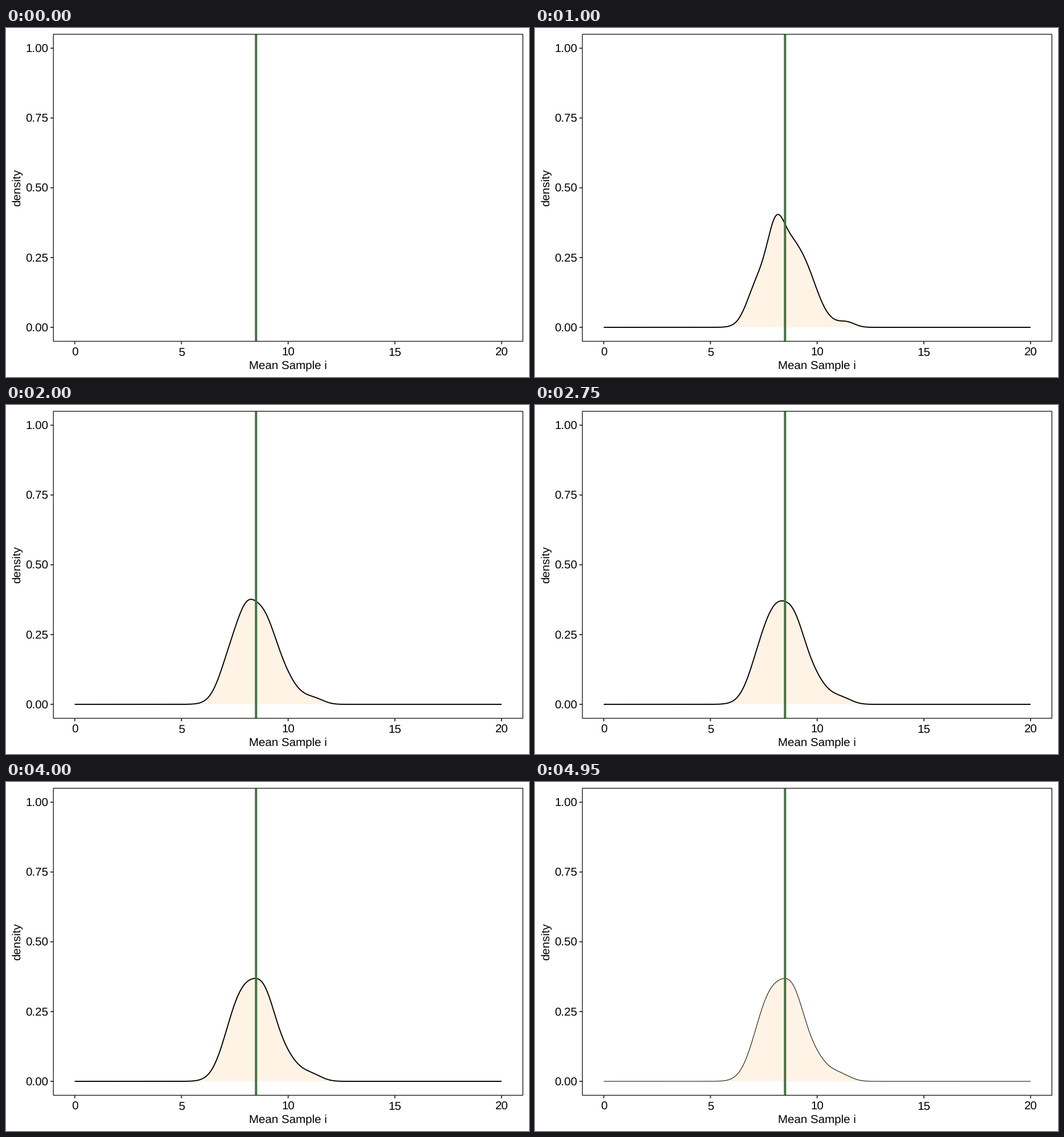
Animation, 917 px wide and 611 px high, one loop 5 s. Source, as a matplotlib script:

```python
import numpy as np
import matplotlib.pyplot as plt
from matplotlib.animation import FuncAnimation
from matplotlib.patches import Polygon, Rectangle

W, H, DPI = 917, 611, 100
PX = 72 / DPI
STEP = 5  # ticks per state, the last one is a blend
TICK_MS = 50
STATES = 19
FRAMES = (STATES + 1) * STEP
FIRST_SHOWN = 3

plt.rcParams["font.family"] = "Liberation Sans"
plt.rcParams["text.hinting"] = "none"
TEXT = dict(fontsize=20.5 * PX, color="black")
LINE = 1.9 * PX
THIN = 1.0 * PX

# Bells (centre, width, height): a lumpy small sample, a smooth large one
LUMPY = [(7.1, .45, .135), (8.1, .43, .388), (8.85, .30, .035),
         (9.35, .62, .255), (11.45, .35, .020)]
SMOOTH = [(7.75, .68, .285), (8.9, .58, .270), (10.0, .50, .062),
          (11.0, .50, .028)]

GRID = np.linspace(0, 20, 512)
LEFT, RIGHT, TOP, BOTTOM = 83.1, 906.3, 11.0, 548.5


def to_x(v):
    return LEFT + (np.asarray(v) + 1) * (RIGHT - LEFT) / 22


def to_y(v):
    return BOTTOM - (np.asarray(v) + .05) * (BOTTOM - TOP) / 1.1


def bells(parts):
    return sum(h * np.exp(-((GRID - c) / s) ** 2 / 2) for c, s, h in parts)


def density(k):
    """Lumps are strongest at the second state and fade with log sample size."""
    lumps = np.exp(-.5 * abs(np.log2((k + 1) / 2)) ** 1.6)
    return lumps * bells(LUMPY) + (1 - lumps) * bells(SMOOTH)


CURVES = [density(k) for k in range(STATES)]

fig = plt.figure(figsize=(W / DPI, H / DPI), dpi=DPI, facecolor="white")
ax = fig.add_axes([0, 0, 1, 1])
ax.set_xlim(0, W)
ax.set_ylim(H, 0)
ax.axis("off")


def stroke(xs, ys, color, width, z):
    ax.plot(xs, ys, color=color, lw=width * PX, zorder=z, snap=False,
            solid_capstyle="butt")


area = Polygon([(0, 0), (0, 0), (0, 0)], fc="#fff3e6", ec="none", zorder=1)
ax.add_patch(area)
curve, = ax.plot([], [], color="black", lw=LINE, zorder=2, snap=False,
                 solid_capstyle="butt", solid_joinstyle="round")

stroke([438.4] * 2, [TOP, BOTTOM], "#407340", 4, 3)
ax.add_patch(Rectangle((LEFT, TOP), RIGHT - LEFT, BOTTOM - TOP, fill=False,
                       ec="#1f1f1f", lw=1.4 * PX, zorder=4, snap=False))

for v in range(0, 21, 5):
    x = to_x(v)
    stroke([x, x], [BOTTOM, BOTTOM + 5.2], "#333333", 1.9, 4)
    ax.text(x, 573.5, str(v), ha="center", va="baseline", **TEXT)
for v in np.linspace(0, 1, 5):
    y = to_y(v)
    stroke([LEFT - 5.2, LEFT], [y, y], "#333333", 1.9, 4)
    ax.text(74, y + 7.4, f"{v:.2f}", ha="right", va="baseline", **TEXT)
ax.text(494.7, 597, "Mean Sample i", ha="center", va="baseline", **TEXT)
ax.text(24.8, 280, "density", rotation=90, rotation_mode="anchor",
        ha="center", va="baseline", **TEXT)


def draw(i):
    shown = i >= FIRST_SHOWN
    area.set_visible(shown)
    curve.set_visible(shown)
    if shown:
        k, part = divmod(max(i - STEP, 0), STEP)
        y = CURVES[k]
        edge = i < STEP or i == FRAMES - 1  # entering or leaving
        if part == STEP - 1 and not edge:
            y = (y + CURVES[k + 1]) / 2
        px, py = to_x(GRID), to_y(y)
        area.set_xy(np.column_stack([np.r_[px, px[-1], px[0]],
                                     np.r_[py, to_y(0), to_y(0)]]))
        curve.set_data(px, py)
        curve.set_linewidth(THIN if edge else LINE)
    return area, curve


anim = FuncAnimation(fig, draw, frames=FRAMES, interval=TICK_MS,
                     repeat=True, repeat_delay=0)
plt.show()
```
